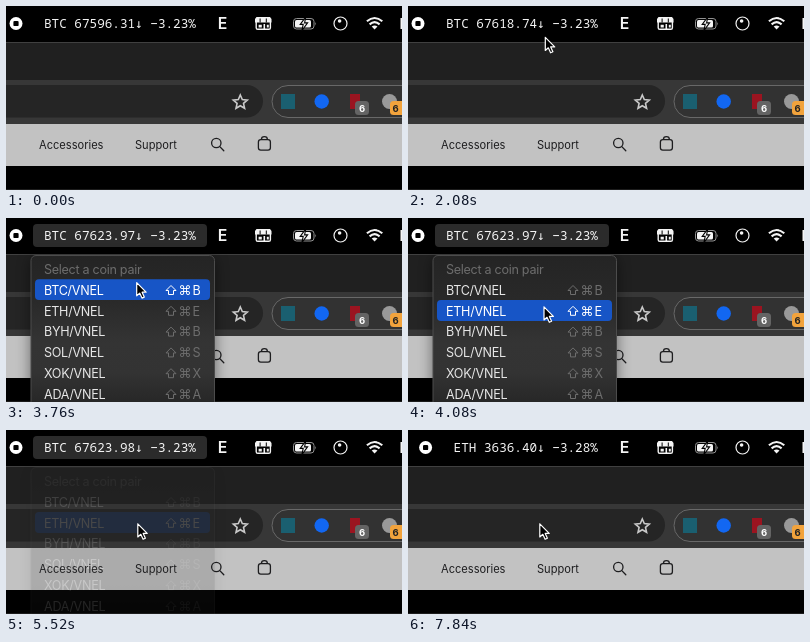
Recreate the animation shown at these times as an HTML page. Size 396 px wide and 184 px high, loop 8000 ms.

```html
<!DOCTYPE html>
<html lang="en">
<head>
<meta charset="utf-8">
<title>Coin ticker</title>
<style>
  html, body { margin: 0; width: 100%; height: 100%; overflow: hidden; background: #000; }
  svg { display: block; width: 396px; height: 184px; font: 12.6px Inter, "Noto Sans", sans-serif; }
  text { white-space: pre; }
  #price { font: 500 12.67px "Noto Sans Mono", "DejaVu Sans Mono", monospace; fill: #f4f4f4; }
  #price .arrow { font-family: "DejaVu Sans Mono", monospace; }
  #menu { filter: drop-shadow(0 3px 7px #0007); }
  #menu text { letter-spacing: -.3px; fill: #e6e6e6; }
  #menu .dim { fill: #6d6d6d; }
  #menu .key { letter-spacing: 0; fill: #6d6d6d; }
  #menu .cmd { font: 13px "DejaVu Sans", sans-serif; }
  #menu .row path { fill: none; stroke: #6d6d6d; stroke-linejoin: round; }
  #menu .row rect { fill: none; }
  #menu .on text { fill: #fff; }
  #menu .on path { stroke: #fff; }
  #menu .on rect { fill: #1755c6; }
  .nav { font-size: 11.1px; fill: #1d1d1f; }
  .badge { font-size: 9.5px; font-weight: 700; text-anchor: middle; }
</style>
</head>
<body>
<svg viewBox="0 0 396 184">
  <defs>
    <linearGradient id="glass" gradientUnits="userSpaceOnUse" x1="0" y1="37" x2="0" y2="184">
      <stop stop-color="#242424"/>
      <stop offset=".3" stop-color="#292929"/>
      <stop offset=".6" stop-color="#343434"/>
      <stop offset=".8" stop-color="#333"/>
      <stop offset="1" stop-color="#272727"/>
    </linearGradient>
  </defs>

  <!-- Browser window -->
  <path fill="#202020" d="M0 37h396v37H0z"/>
  <path fill="#404040" d="M0 36h396v1H0z"/>
  <path fill="#373737" d="M0 74h396v44H0z"/>
  <rect x="-30" y="79" width="287" height="32.5" rx="16.2" fill="#252525"/>
  <rect x="266" y="79.5" width="160" height="32" rx="16" fill="#323232" stroke="#686868"/>
  <path fill="none" stroke="#c9c9c9" stroke-width="1.6"
    d="M234.3 89l2 4.6 5 .5-3.8 3.3 1.1 4.9-4.3-2.6-4.3 2.6 1.1-4.9-3.8-3.3 5-.5z"/>
  <rect x="275" y="88" width="14" height="15" fill="#1a5f70"/>
  <circle cx="315.7" cy="95.5" r="7.2" fill="#1267f2"/>
  <rect x="344" y="88" width="10" height="15" fill="#9b1420"/>
  <rect x="349" y="95" width="14" height="14" rx="3.5" fill="#646464"/>
  <text class="badge" x="356" y="105.5" fill="#fff">6</text>
  <circle cx="383.5" cy="95.5" r="7.5" fill="#999"/>
  <rect x="384" y="95" width="15" height="14" rx="3.5" fill="#f2a33c"/>
  <text class="badge" x="389.5" y="105.5" fill="#222">6</text>

  <!-- Page navigation -->
  <path fill="#c2c2c2" d="M0 118h396v42H0z"/>
  <path fill="#1c1c1c" d="M0 183h396v1H0z"/>
  <text class="nav" x="33" y="142.5">Accessories</text>
  <text class="nav" x="129" y="142.5">Support</text>
  <g fill="none" stroke="#1d1d1f" stroke-width="1.3" stroke-linecap="round">
    <circle cx="210.3" cy="137" r="4.7"/>
    <path d="M213.8 140.6l4 4.2"/>
    <rect x="252.4" y="133.6" width="12" height="10.6" rx="2.4"/>
    <path d="M255.4 133.4a3 2.8 0 0 1 6 0"/>
  </g>

  <!-- Menu bar -->
  <rect id="active" x="27" y="6" width="174" height="23" rx="4" fill="#2b2b2b"/>
  <g id="status">
    <circle cx="10" cy="17.5" r="6.5" fill="#fff"/>
    <rect x="7.4" y="14.9" width="5.2" height="5.2" rx="1.2"/>
  </g>
  <text id="price" y="22"><tspan></tspan><tspan class="arrow">↓</tspan><tspan></tspan></text>
  <g fill="#f4f4f4">
    <text x="211.8" y="23.3" font-size="15.8" font-weight="600">E</text>
    <path d="M250.5 11h13.5l1.5 2v3.5h-16.5v-3.5z"/>
    <rect x="250.2" y="13" width="14.2" height="10.3" rx="1.6" fill="none" stroke="#f4f4f4" stroke-width="1.4"/>
    <path d="M257.5 18h1.6v5h-1.6z"/>
    <path fill="#000" d="M253.6 12.5h1v4h-1zM259.8 12.5h1v4h-1z"/>
    <path d="M252.6 18.8h3.2v2.6h-3.2zM260.8 18.8h2v2.6h-2z"/>
    <rect x="287.5" y="12.5" width="20.5" height="10.5" rx="3" fill="none" stroke="#929292"/>
    <rect x="289" y="14" width="16" height="7.5" rx="1.6"/>
    <path fill="#929292" d="M309.3 16q1.6 1.7 0 3.6z"/>
    <path stroke="#000" stroke-width="1.1" d="M299.8 10.8l-5.6 7.6h3l-1.3 6.2 5.7-7.7h-3z"/>
    <circle cx="334.5" cy="17.5" r="6.5" fill="none" stroke="#f4f4f4" stroke-width="1.2"/>
    <circle cx="333.6" cy="15" r="1.8"/>
    <path d="M368.6 23.6l-2.9-3q2.9-2.4 5.8 0z"/>
    <path fill="none" stroke="#f4f4f4" stroke-width="2.1" d="M363.6 18.4q5-4.4 10 0M360.9 15.3q7.7-6.6 15.4 0"/>
    <path d="M394.5 12h2v11h-2z"/>
  </g>

  <g id="menu">
    <rect x="25" y="37.5" width="183.5" height="180" rx="5" fill="url(#glass)" stroke="#4c4c4c"/>
    <text class="dim" x="38" y="56">Select a coin pair</text>
  </g>
  <path id="cursor" stroke="#fff" stroke-width="1.2" stroke-linejoin="round"
    d="M.5 .8v13.2l3-2.7 2.3 5 2.3-1-2.2-4.9h4z"/>
</svg>
<script>
const $ = id => document.getElementById(id);
const LOOP = 8000, STEP = 80, ROW_TOP = 61.3, ROW_HEIGHT = 20.8;
const OPEN = 2800, BLINK = 5280, FADE = 5360, CLOSED = 5600;

const prices = [
  [0, 'BTC 67596.31'], [80, 'BTC 67596.40'], [1040, 'BTC 67618.74'],
  [3360, 'BTC 67623.97'], [5120, 'BTC 67623.98'],
  [5680, 'ETH 3635.90'], [6480, 'ETH 3635.97'], [7120, 'ETH 3636.40']
];

// Pointer path: time, x, y
const path = [
  [1040, 398, 88], [1400, 230, 58], [1760, 141, 36], [1920, 141, 36],
  [2080, 136.8, 30.5], [2400, 126, 17], [2720, 131.3, 22], [3360, 131.3, 22],
  [3720, 130, 60], [4080, 135.5, 88], [4240, 135.5, 88], [4560, 134, 106],
  [4960, 132.5, 98], [5120, 132, 97], [5300, 131.3, 93], [LOOP, 131.3, 93]
];

const pairs = [['BTC', 'B'], ['ETH', 'E'], ['BYH', 'B'], ['SOL', 'S'], ['XOK', 'X'], ['ADA', 'A']];
pairs.forEach(([coin, key], i) => {
  const top = ROW_TOP + i * ROW_HEIGHT, y = top + 15.4;
  $('menu').insertAdjacentHTML('beforeend', `<g class="row">
    <rect x="29" y="${top}" width="175" height="${ROW_HEIGHT}" rx="4"/>
    <text x="38" y="${y}">${coin}/VNEL</text>
    <path d="M165 ${y - 9.2}l5 5h-2.5v4h-5v-4H160z"/>
    <text class="key cmd" x="172.3" y="${y}">⌘</text>
    <text class="key" x="186.5" y="${y}">${key}</text></g>`);
});
const rows = document.querySelectorAll('.row');
const [amount, , change] = $('price').children;

const slope = (i, axis) => (path[i + 1][axis] - path[i][axis]) / (path[i + 1][0] - path[i][0]);

// Smooth through the points, but come to rest at pauses and turns.
function tangent(i, axis) {
  if (i === 0) return slope(0, axis);
  if (i === path.length - 1) return 0;
  const a = slope(i - 1, axis), b = slope(i, axis);
  return a * b > 0 ? 2 * a * b / (a + b) : 0;
}

function pointer(t, axis) {
  const i = Math.max(0, path.findIndex(p => p[0] > t) - 1);
  const a = path[i], b = path[i + 1], span = b[0] - a[0], u = (t - a[0]) / span;
  const ease = u * u * (3 - 2 * u);
  return a[axis] + (b[axis] - a[axis]) * ease
    + span * u * (1 - u) * ((1 - u) * tangent(i, axis) - u * tangent(i + 1, axis));
}

function draw(t) {
  const price = prices.findLast(p => p[0] <= t)[1];
  const isEth = price.startsWith('ETH');
  amount.textContent = price;
  change.textContent = ` −${isEth ? '3.28' : '3.23'}%`;
  $('price').setAttribute('x', 190 - 7.6 * $('price').textContent.length);
  $('status').setAttribute('transform', `translate(${isEth ? 7.6 : 0})`);

  const visible = t >= path[0][0];
  const x = pointer(t, 1), y = pointer(t, 2);
  $('cursor').style.display = visible ? '' : 'none';
  $('cursor').setAttribute('transform', `translate(${x} ${y})`);

  const open = t >= OPEN && t < CLOSED;
  $('active').style.display = $('menu').style.display = open ? '' : 'none';
  $('menu').style.opacity = Math.min(1, Math.max(0, 1 - (t - FADE) / 190));
  const hovered = t >= BLINK && t < FADE ? -1 : Math.floor((y - ROW_TOP) / ROW_HEIGHT);
  rows.forEach((row, i) => row.classList.toggle('on', i === hovered));
}

const start = performance.now();
function tick() {
  const t = (performance.now() - start) % LOOP;
  draw(Math.floor(t / STEP) * STEP);
  requestAnimationFrame(tick);
}
tick();
</script>
</body>
</html>
```
